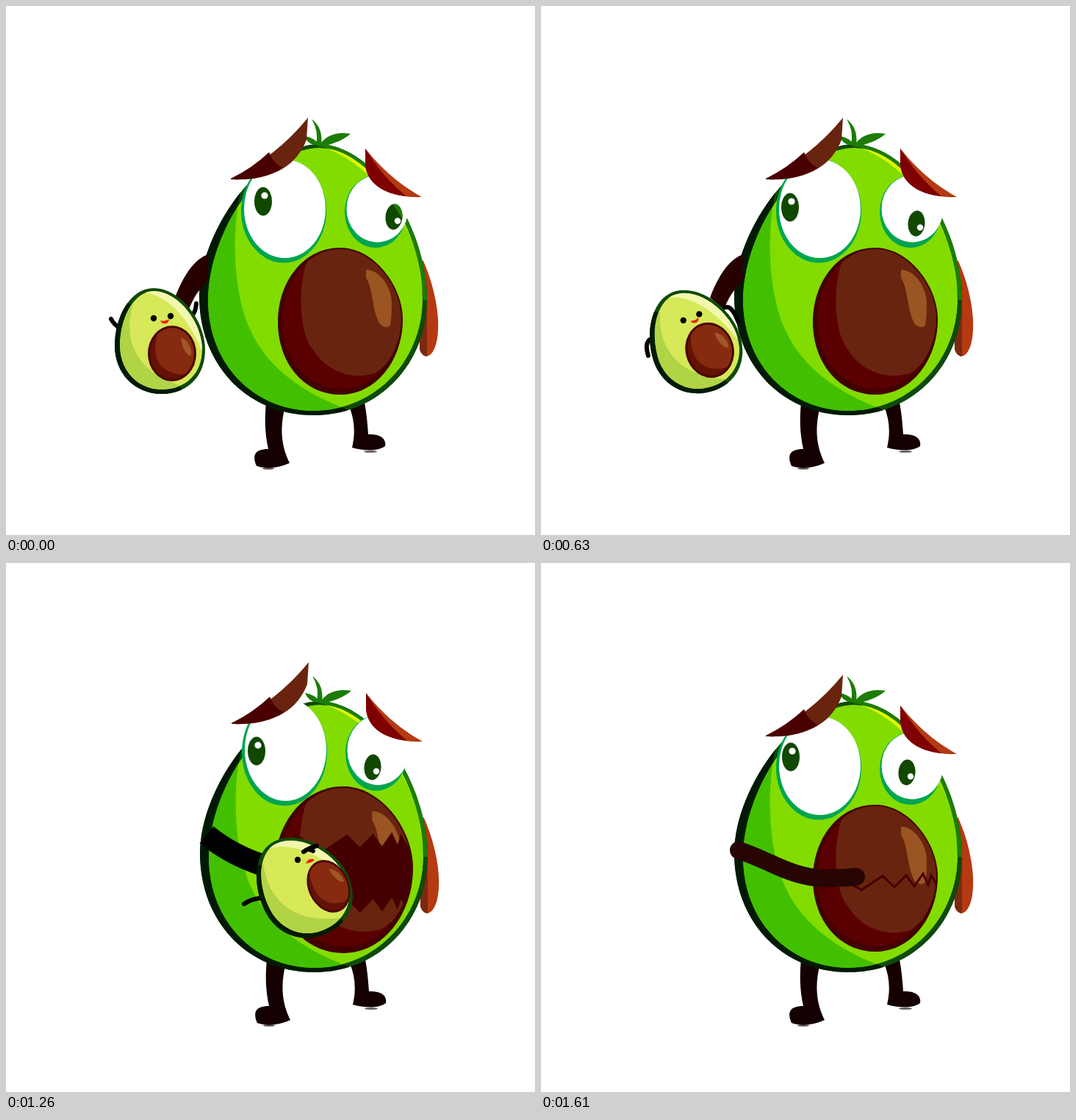
Write an HTML page that moves like this. It is 720x720 px and loops after 1710 ms.

```html
<!DOCTYPE html>
<html lang="en">
<head>
<meta charset="utf-8">
<title>Hungry avocado</title>
<style>
html, body { margin: 0; width: 100%; height: 100%; overflow: hidden; background: #fff; }
svg { display: block; width: 100vw; height: 100vh; }
</style>
</head>
<body>
<svg viewBox="0 0 720 720">
<defs>
  <path id="skin" d="M425 188C500 188 573 300 573 400C573 485 510 557 418 557C330 557 263 490 263 395C263 305 350 188 425 188Z"/>
  <path id="flesh" d="M426 193C497 193 567 303 567 400C567 480 505 551 418 551C340 551 275 490 275 400C275 310 350 193 426 193Z"/>
  <path id="dark" d="M200 240H323C308 285 305 380 332 440C355 492 405 528 470 551V600H200Z"/>
  <path id="lit" d="M400 60L426 190C470 204 506 235 537 286C555 320 564 350 568 400H640V60Z"/>
  <path id="pitSkin" d="M455 329C500 329 540 380 540 427C540 480 505 529 455 529C405 529 370 485 370 430C370 375 405 329 455 329Z"/>
  <path id="pitFlesh" d="M455 331C499 331 538 381 538 426C538 474 502 521 457 521C411 521 376 481 376 430C376 377 409 331 455 331Z"/>
  <path id="rind" d="M-8-72C28-72 62-28 62 12C62 48 38 72 3 72C-33 72-61 45-61 6C-61-33-40-72-8-72Z"/>
  <path id="pulp" d="M-8-68C25-68 58-26 58 12C58 44 36 66 3 66C-30 66-54 40-54 6C-54-30-36-68-8-68Z"/>
  <path id="pulpShade" d="M-80-60L-36-50C-50-5-35 40 27 60L40 90H-80Z"/>
  <clipPath id="inSkin"><use href="#skin"/></clipPath>
  <clipPath id="inFlesh"><use href="#flesh"/></clipPath>
  <clipPath id="inDark"><use href="#dark"/></clipPath>
  <clipPath id="inLit"><use href="#lit"/></clipPath>
  <clipPath id="inPit"><use href="#pitFlesh"/></clipPath>
  <clipPath id="inPulp"><use href="#pulp"/></clipPath>
  <clipPath id="inRind"><use href="#rind"/></clipPath>
  <clipPath id="inStone"><ellipse rx="30" ry="35"/></clipPath>
  <g id="stone">
    <ellipse rx="33" ry="38" fill="#4a0505"/>
    <g clip-path="url(#inStone)">
      <ellipse rx="30" ry="35" fill="#641206"/>
      <path d="M-14-45C-30-5-25 22 8 28C20 30 28 24 40 10V-45Z" fill="#862a10"/>
    </g>
    <path d="M12-22C22-18 28-6 26 3C20 4 13-8 12-22Z" fill="#a05726"/>
  </g>
  <g id="fruit">
    <use href="#rind" fill="#0f4a0a"/>
    <g clip-path="url(#inRind)"><use href="#pulpShade" fill="#001a05"/></g>
    <g clip-path="url(#inPulp)">
      <use href="#pulp" fill="#d7e859"/>
      <use href="#pulpShade" fill="#b0d445"/>
      <path d="M-22-66C10-64 40-30 57 12L75-20L10-85Z" fill="#f2f7ae"/>
    </g>
  </g>
</defs>

<g id="all">
  <g fill="#140000">
    <path d="M354 540L380 545C372 575 375 600 386 622C370 629 355 631 341 626C335 612 338 603 357 603C352 580 352 560 354 540Z"/>
    <path d="M467 545L488 540C491 555 492 570 493 583C508 582 518 588 516 599C505 607 485 605 471 601C476 580 474 562 467 545Z"/>
    <ellipse cx="357" cy="629.5" rx="8" ry="1.3" opacity=".7"/>
    <ellipse cx="496" cy="606.5" rx="9" ry="1.3" opacity=".7"/>
  </g>
  <path d="M567 345C581 375 590 415 588 442C586 480 568 484 563 467Z" fill="#b53a12"/>
  <path d="M560 380H573V477C567 476 563 471 563 465Z" fill="#7a2a10"/>

  <g clip-path="url(#inSkin)">
    <use href="#skin" fill="#0f4a0a"/>
    <use href="#dark" fill="#001a05"/>
    <use href="#lit" fill="#1c7c06"/>
  </g>
  <g clip-path="url(#inFlesh)">
    <use href="#flesh" fill="#82dc00"/>
    <use href="#dark" fill="#42c000"/>
    <use href="#lit" fill="#e0f800"/>
  </g>
  <g fill="#1c7c06">
    <path d="M406 177Q418 178 428 190Q412 191 406 177Z"/>
    <path d="M416 154Q432 166 429 189L422 189Q426 170 416 154Z"/>
    <path d="M425 192Q438 169 469 174Q454 187 425 192Z"/>
  </g>

  <g fill="#00a550">
    <ellipse class="eyeL" cx="378" cy="279" rx="58" ry="70.5"/>
    <ellipse class="eyeR" cx="503" cy="280" rx="42" ry="49"/>
  </g>
  <g clip-path="url(#inLit)"><ellipse class="eyeR" cx="503" cy="280" rx="42" ry="49" fill="#00ee98"/></g>
  <g fill="#fff">
    <ellipse class="eyeL" cx="379.5" cy="276" rx="55.5" ry="67"/>
    <ellipse class="eyeR" cx="505.5" cy="276" rx="42" ry="45.5"/>
  </g>
  <g class="pupL"><ellipse rx="12" ry="19.5" fill="#114800"/><circle cx="2" cy="-8" r="4.6" fill="#fff"/></g>
  <g class="pupR"><ellipse rx="11.5" ry="17.5" fill="#114800" transform="rotate(5)"/></g>
  <g clip-path="url(#inLit)"><g class="pupR"><ellipse rx="11.5" ry="17.5" fill="#1c7c06" transform="rotate(5)"/></g></g>
  <g class="pupR"><circle cx="5" cy="5.5" r="4.2" fill="#fff"/></g>

  <g id="brows">
    <path d="M306 235Q368 205 411 152L409 182C396 216 365 238 306 236Z" fill="#69240f"/>
    <path id="glow" d="M350 211Q380 192 397 171L410 169L408 184C400 196 378 190 360 206Z" fill="#b53a12"/>
    <path d="M306 235Q336 220 358 199Q363 213 376 220C357 233 335 237 306 236Z" fill="#4a0000"/>
    <path d="M489 194Q522 236 566 260C528 262 492 246 489 216Z" fill="#b53a12"/>
    <path d="M489 194Q512 232 545 259C515 256 491 242 489 216Z" fill="#7f0000"/>
  </g>

  <g class="pit">
    <use href="#pitSkin" fill="#440000"/>
    <g clip-path="url(#inPit)">
      <use href="#pitFlesh" fill="#5a0000"/>
      <path d="M424 320C395 355 395 440 418 468C440 502 475 508 502 500C530 482 545 450 545 410V320Z" fill="#69240f"/>
      <path d="M490 359C505 358 523 378 525 402Q525 425 523 435Q517 440 509 433C498 415 500 385 490 370Z" fill="#9a5522"/>
      <path id="mouth" fill="#440000"/>
      <path id="crack" fill="none" stroke="#440000" pathLength="1"/>
    </g>
  </g>
  <g clip-path="url(#inDark)" opacity=".45"><use class="pit" href="#pitSkin"/></g>

  <path id="armDown" d="M275 338C255 345 240 370 230 397L249 413C255 395 268 380 275 373Z" fill="#280000"/>
  <path id="armReach" fill="none" stroke="#000" stroke-width="30"/>

  <g id="hang" fill="none" stroke="#000" stroke-width="6" stroke-linecap="round">
    <path id="flapL"/><path id="flapR"/>
    <g stroke="none">
      <use href="#fruit"/>
      <use href="#stone" x="17" y="17"/>
      <g fill="#000"><circle cx="-8" cy="-31" r="4.2"/><circle cx="15" cy="-34" r="4.2"/></g>
      <path d="M1-28Q7-26 13-30Q12-23 7-24Q3-23 1-28Z" fill="#f02010"/>
    </g>
  </g>
  <g id="turned">
    <path d="M-80 24Q-68 15-50 16" fill="none" stroke="#000" stroke-width="6" stroke-linecap="round"/>
    <use class="spin" href="#fruit"/>
    <use href="#stone" transform="translate(35 0) rotate(-25) scale(.84 .98)"/>
    <circle cx="-7" cy="-36" r="4.2"/>
    <path d="M1-47Q10-53 19-55M9-50L14-48" fill="none" stroke="#000" stroke-width="6" stroke-linecap="round"/>
    <path d="M4-31Q8-40 16-36Q13-32 4-31Z" fill="#f02010"/>
  </g>
  <g id="back">
    <g class="spin">
      <use href="#rind" fill="#0f4a0a"/>
      <g clip-path="url(#inRind)"><use href="#pulpShade" fill="#001a05"/></g>
      <use href="#pulp" fill="#c8c84a"/>
    </g>
    <path d="M-60 0C-35 42 15 50 59 36C48 55 25 63 4 62C-25 60-45 40-60 0Z" fill="#a8b43a"/>
    <path d="M28-51L43-69" stroke="#000" stroke-width="5" stroke-linecap="round"/>
  </g>
  <path id="armHug" d="M269 391C310 404 340 428 385 429Q410 429 429 427" fill="none" stroke="#280505" stroke-width="24" stroke-linecap="round"/>
</g>
</svg>
<script>
const LOOP = 1710, STEP = 70, LAST = 23;

// Each row: step, then values; linear in between, held outside.
const pupils = [[0, 350, 266, 528, 287], [3, 348, 267, 526, 288], [9, 339, 274, 511, 296],
  [14, 338, 281, 502, 298], [18, 340, 275, 498, 297], [21, 351, 257, 529, 281], [23, 340, 264, 498, 285]];
const lift = [[16, 0, 0, 1], [18, 17, 19, 1.04], [21, 70, 61, 1.16], [23, 0, 0, 1]];
const pitBox = [[16, 370, 329, 540, 529], [18, 364, 304, 553, 531], [21, 320, 264, 562, 551], [23, 370, 329, 540, 529]];
const gape = [[16, 0], [18, .74], [21, 1], [23, 0]];
const split = [[11, 0], [14, .62], [16, 1]];
const kid = [[14, 209, 456], [15, 262, 454], [16, 310, 450], [18, 403, 440], [21, 449, 418]];
const hand = [[14, 30, -55], [18, -55, -29]];
const tilt = [[14, -10.5], [18, -25], [21, -45]];
const teeth = [[383, 445], [402, 425], [436, 445], [465, 426], [481, 441], [497, 425],
  [508, 440], [520, 423], [527, 438], [531, 425], [540, 440]];

const $ = id => document.getElementById(id);
const attr = (el, name, v) => el.setAttribute(name, v);
const move = (cls, v) => document.querySelectorAll('.' + cls).forEach(el => attr(el, 'transform', v));
const show = (id, on) => $(id).style.display = on ? '' : 'none';

function at(rows, s) {
  const i = rows.findIndex(r => r[0] >= s);
  if (i < 0) return rows[rows.length - 1].slice(1);
  if (i === 0) return rows[0].slice(1);
  const a = rows[i - 1], b = rows[i], k = (s - a[0]) / (b[0] - a[0]);
  return a.slice(1).map((v, j) => v + (b[j + 1] - v) * k);
}

function drawFace(s) {
  const [brow, eye, tall] = at(lift, s), [lx, ly, rx, ry] = at(pupils, s);
  const stretch = base => `translate(0 ${base * (1 - tall) - eye}) scale(1 ${tall})`;
  attr($('all'), 'transform', `translate(${s > 16 && s < 20 ? 1 : 0} 0)`);
  attr($('brows'), 'transform', `translate(0 ${-brow})`);
  show('glow', brow > 45);
  move('eyeL', stretch(349));
  move('eyeR', stretch(329));
  move('pupL', `translate(${lx} ${ly - eye})`);
  move('pupR', `translate(${rx} ${ry - eye})`);
}

function drawMouth(s) {
  const [l, t, r, b] = at(pitBox, s), [g] = at(gape, s), [p] = at(split, s);
  move('pit', `translate(${l} ${t}) scale(${(r - l) / 170} ${(b - t) / 200}) translate(-370 -329)`);
  const edge = dy => [[360, 458], ...teeth, [570, 435]].map(([x, y]) => [x - 8 * g, y + dy]);
  attr($('mouth'), 'd', g ? 'M' + [...edge(-53 * g), ...edge(53 * g).reverse()].join('L') + 'Z' : '');
  attr($('crack'), 'd', 'M' + teeth.join('L'));
  attr($('crack'), 'stroke-width', s > 21 ? 3 : 1.6);
  attr($('crack'), 'stroke-dasharray', `${p} 2`);
  show('crack', p > 0 && g === 0);
}

function drawKid(s) {
  const [x, y] = at(kid, s), k = (1 - Math.cos(s * Math.PI / 3)) / 2;
  const turn = s < 15 ? -14 * k : at(tilt, s)[0];
  const [hx, hy] = at(hand, s);
  attr($('hang'), 'transform', `translate(${x} ${y}) rotate(${turn})`);
  attr($('flapL'), 'd', `M-53-17Q${-62 - 5 * k} ${-22 + 3 * k} ${-66} ${-30 + 34 * k}`);
  attr($('flapR'), 'd', `M${43 + 6 * k} -34Q${49 + 12 * k} -38 ${50 + 14 * k} ${-51 + 40 * k}`);
  attr($('turned'), 'transform', `translate(${x} ${y})`);
  attr($('back'), 'transform', `translate(${x} ${y})`);
  move('spin', `rotate(${turn})`);
  attr($('armReach'), 'd', `M272 370Q305 397 ${x + hx} ${y + hy}`);
  show('hang', s < 17);
  show('turned', s > 16 && s < 20);
  show('back', s > 19 && s < 22);
  show('armDown', s < 15);
  show('armReach', s > 14 && s < 20);
  show('armHug', s > 19);
}

let shown = -1;
function draw(now) {
  const s = Math.min(LAST, Math.floor(now % LOOP / STEP));
  if (s !== shown) {
    shown = s;
    drawFace(s);
    drawMouth(s);
    drawKid(s);
  }
}

const start = performance.now();
function tick() {
  draw(performance.now() - start);
  requestAnimationFrame(tick);
}
tick();
</script>
</body>
</html>
```
